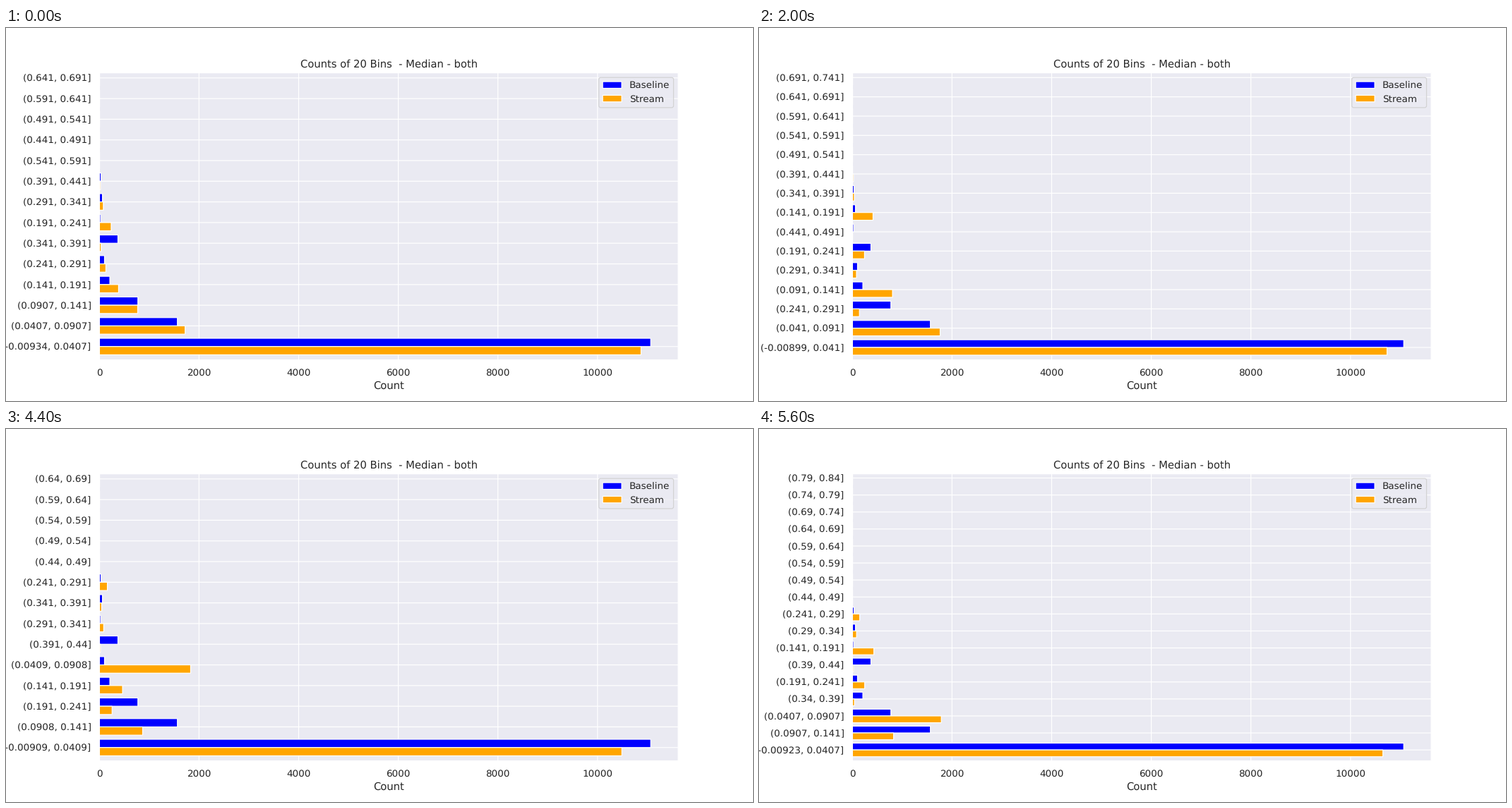
Write a matplotlib script that moves like this. It is 1058 px wide and 529 px high and loops after 5.8 s.

```python
import numpy as np
import matplotlib.pyplot as plt
from matplotlib.animation import FuncAnimation

FRAMES, STEP_MS = 29, 200
INK = "0.15"

plt.rcParams.update({
    "font.family": "DejaVu Sans", "text.color": INK, "text.hinting": "none",
    "axes.labelcolor": INK, "xtick.color": INK, "ytick.color": INK,
    "axes.facecolor": "#EAEAF2", "axes.edgecolor": "white",
    "axes.linewidth": 1.25, "axes.axisbelow": True,
    "axes.grid": True, "grid.color": "white", "grid.linewidth": 1,
    "axes.titlesize": 12, "axes.labelsize": 12, "legend.fontsize": 11,
    "xtick.labelsize": 11, "ytick.labelsize": 11,
    "xtick.major.size": 6, "ytick.major.size": 6,
    "xtick.bottom": False, "ytick.left": False,
    "patch.edgecolor": "white", "patch.linewidth": 1,
    "patch.force_edgecolor": True, "path.snap": False,
})

# Step, row count, drift of the stream, lowest bin edge, bins met first
KEYS = [
    (0, 14, 0.26, -0.00934, [0, 1, 2, 3, 5, 7, 4, 6, 8, 11]),
    (5, 15, 0.00, -0.00939, [0, 1, 5, 2, 3, 6, 7, 4, 8, 9, 11]),
    (10, 15, 0.53, -0.00899, [0, 1, 5, 2, 6, 4, 9, 3]),
    (18, 15, 0.81, -0.00904, [1, 0, 4, 2, 6, 3, 5, 8, 11]),
    (22, 14, 1.00, -0.00909, [0, 2, 4, 3, 1, 8, 6, 7]),
    (24, 15, 0.94, -0.00917, [1, 0, 8, 4, 2]),
    (28, 17, 0.69, -0.00923, [0, 2, 1, 7, 4, 8, 3, 6]),
]
STEPS, ROWS, DRIFT, LOW, FIRST = zip(*KEYS)

# Counts of the lowest bins; those above hold only a few readings
BASELINE = [11068, 1566, 773, 210, 103, 372, 26, 62, 34]
STREAM = [11008, 1682, 734, 357, 231, 120, 77, 32, 22]
SHIFT = [-520, 150, 135, 108, 24, 40, 10, 15, 0]
FEW = 5


def counts(values):
    return np.pad(values, (0, 20 - len(values)), constant_values=FEW)


def row_order(i):
    """Bins met first, then the others in rising order."""
    key = np.argmin(np.abs(np.array(STEPS) - i))
    first = FIRST[key]
    rest = [k for k in range(20) if k not in first]
    return (first + rest)[:ROWS[key]]


fig, ax = plt.subplots(figsize=(12, 6), dpi=88.1667)


def draw(i):
    order = row_order(i)
    n = len(order)
    rows = np.arange(n)
    low = np.interp(i, STEPS, LOW)
    width = 0.05 if i < 14 else 0.04995
    drift = np.interp(i, STEPS, DRIFT)
    stream = counts(np.array(STREAM) + drift * np.array(SHIFT))

    ax.clear()
    ax.barh(rows, counts(BASELINE)[:n], 0.4, align="edge",
            color="blue", label="Baseline")
    ax.barh(rows - 0.4, stream[order], 0.4, align="edge",
            color="orange", label="Stream")
    ax.set_xlim(0, 1.05 * BASELINE[0])
    ax.set_ylim(-0.65, n - 0.75)
    ax.set_yticks(rows, [f"({low + k * width:.3g}, {low + (k + 1) * width:.3g}]"
                         for k in order])
    ax.set_xlabel("Count")
    ax.set_title("Counts of 20 Bins  - Median - both")
    ax.legend(loc="upper right")
    return []


anim = FuncAnimation(fig, draw, frames=FRAMES, interval=STEP_MS,
                     init_func=lambda: draw(0), repeat=True, repeat_delay=0)
plt.show()
```
